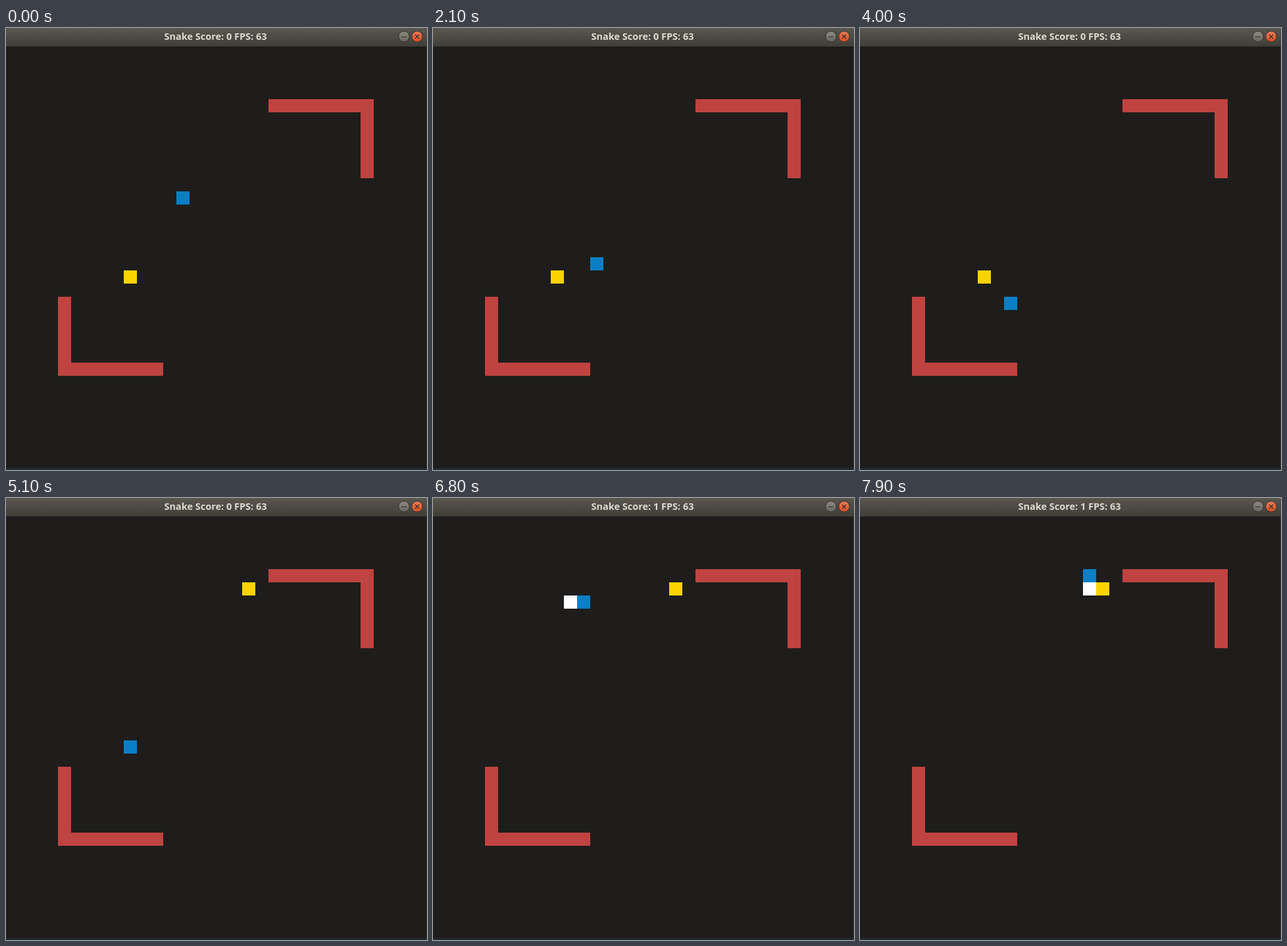
An HTML page that plays this animation: 640x671 px, repeating every 8000 ms.

```html
<!DOCTYPE html>
<html lang="en">
<head>
<meta charset="utf-8">
<title>Snake</title>
<style>
  html, body { margin: 0; width: 100%; height: 100%; overflow: hidden; background: #1e1d1b; }
  svg { display: block; width: 640px; height: 671px; }
  text { font: bold 14.5px "Open Sans", "Noto Sans", sans-serif; fill: #dfdbd2; text-anchor: middle; }
</style>
</head>
<body>
<svg viewBox="0 0 640 671">
  <defs>
    <linearGradient id="bar" x2="0" y2="1">
      <stop offset="0" stop-color="#59574e"/>
      <stop offset="1" stop-color="#3f3e38"/>
    </linearGradient>
    <linearGradient id="grey" x2="0" y2="1">
      <stop offset="0" stop-color="#8f8c83"/>
      <stop offset="1" stop-color="#66645c"/>
    </linearGradient>
    <linearGradient id="orange" x2="0" y2="1">
      <stop offset="0" stop-color="#f0805c"/>
      <stop offset="1" stop-color="#d84a20"/>
    </linearGradient>
  </defs>
  <rect width="640" height="671" fill="#1e1d1b"/>

  <rect width="640" height="28" fill="url(#bar)"/>
  <text id="title" x="318.5" y="18"></text>
  <g stroke="#302f2b">
    <circle cx="605" cy="13" r="8.2" fill="url(#grey)"/>
    <circle cx="625" cy="13" r="8.2" fill="url(#orange)"/>
    <path d="M601 13.5h8M622 10l6 6m0-6l-6 6" stroke-width="1.2"/>
  </g>

  <path d="M399 108h160v120h-20v-100h-140zM79 408h20v100h140v20h-160z" fill="#bf4341"/>
  <rect id="food" width="20" height="20" fill="#fbd400"/>
  <rect id="tail" width="20" height="20" fill="#fff"/>
  <rect id="head" width="20" height="20" fill="#0a7fc6"/>

  <path d="M639.5 28v640" stroke="#34332e"/>
  <rect y="668" width="640" height="3" fill="#202b31"/>
</svg>
<script>
const LOOP = 8000, CELL = 20, LEFT = -1, TOP = 28;
const EAT_TIME = 5100;
const MOVES = "LLLLLDDD" + "DDRRRRR" + "LLLLLDDD" + "RRRRUL" +
              "LLUUUUUU" + "UUUUUURR" + "RRRRRRUU";
// Moment of each move, in tenths of a second.
const TICKS = [
  2, 3, 5, 6, 8, 9, 11, 12,
  14, 15, 17, 18, 20, 21, 23,
  25, 26, 28, 30, 32, 33, 34, 35,
  37, 38, 40, 42, 44, 46,
  48, 49, 51, 52, 53, 55, 56, 57,
  59, 60, 62, 63, 64, 66, 67, 68,
  70, 71, 72, 74, 75, 76, 78, 79
];
const DIRECTIONS = { L: [-1, 0], R: [1, 0], U: [0, -1], D: [0, 1] };

const path = [[13, 11]];
for (const move of MOVES) {
  const [x, y] = path[path.length - 1], [dx, dy] = DIRECTIONS[move];
  path.push([x + dx, y + dy]);
}
const eatStep = TICKS.indexOf(EAT_TIME / 100) + 1;

const [title, food, tail, head] =
  ["title", "food", "tail", "head"].map(id => document.getElementById(id));

function place(block, [column, row]) {
  block.setAttribute("x", LEFT + column * CELL);
  block.setAttribute("y", TOP + row * CELL);
}

function draw(time) {
  const step = TICKS.filter(tick => tick * 100 <= time).length;
  const grown = step > eatStep;
  place(head, path[step]);
  place(tail, path[Math.max(0, step - 1)]);
  place(food, step < eatStep ? [9, 17] : [18, 5]);
  tail.style.display = grown ? "" : "none";
  title.textContent = `Snake Score: ${grown ? 1 : 0} FPS: 63`;
}

const start = performance.now();
function frame() {
  draw((performance.now() - start) % LOOP);
  requestAnimationFrame(frame);
}
frame();
</script>
</body>
</html>
```
